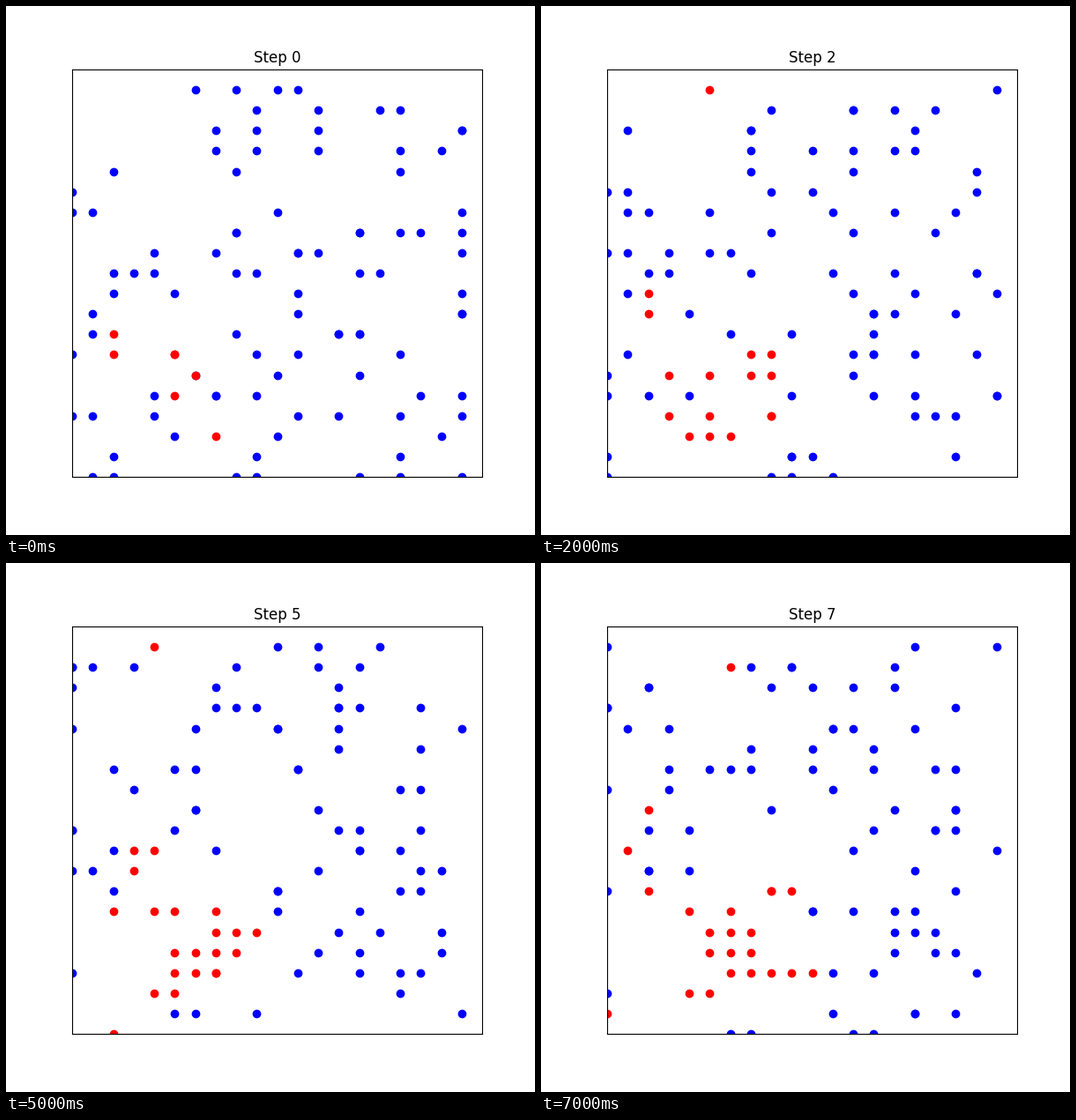
Animation, 600 px wide and 600 px high, one loop 8000 ms. Source, as a matplotlib script:

```python
import numpy as np
import matplotlib.pyplot as plt
from matplotlib.animation import FuncAnimation

SIZE = 20
STEPS = 8
AGENTS = 100
FIRST_SICK = [(2, 7), (2, 6), (5, 6), (5, 6), (6, 5), (5, 4), (7, 2)]


def sick_total(step):
    """The outbreak grows quickly at first and levels off near 24."""
    return round(24 - 17 * np.exp(-step / 2.6))


def exposure(agents, sources):
    """Distance on the torus from each agent to the nearest source."""
    gap = np.abs(agents[:, None] - sources[None])
    gap = np.minimum(gap, SIZE - gap)
    return np.hypot(gap[..., 0], gap[..., 1]).min(axis=1)


def simulate():
    rng = np.random.default_rng(7)
    moves = np.array([(dx, dy) for dx in (-1, 0, 1) for dy in (-1, 0, 1)
                      if dx or dy])
    agents = rng.integers(SIZE, size=(AGENTS, 2))
    agents[:len(FIRST_SICK)] = FIRST_SICK
    sick = np.arange(AGENTS) < len(FIRST_SICK)
    states = [(agents, sick)]
    for step in range(1, STEPS):
        agents = (agents + rng.choice(moves, size=AGENTS)) % SIZE
        # The healthy agents nearest to the outbreak catch it.
        distance = exposure(agents, agents[sick])
        nearest = np.argsort(np.where(sick, -1, distance), kind="stable")
        sick = np.zeros(AGENTS, dtype=bool)
        sick[nearest[:sick_total(step)]] = True
        states.append((agents, sick))
    return states


states = simulate()

fig, ax = plt.subplots(figsize=(6, 6), dpi=100)
ax.set(xlim=(0, SIZE), ylim=(0, SIZE), xticks=[], yticks=[])
title = ax.set_title("Step 0")
healthy_dots, = ax.plot([], [], "o", color="blue")
sick_dots, = ax.plot([], [], "o", color="red")


def draw(step):
    agents, sick = states[step]
    healthy_dots.set_data(*agents[~sick].T)
    sick_dots.set_data(*agents[sick].T)
    title.set_text(f"Step {step}")
    return healthy_dots, sick_dots, title


anim = FuncAnimation(fig, draw, frames=STEPS, interval=1000, repeat=True,
                     repeat_delay=0, blit=False)
plt.show()
```
